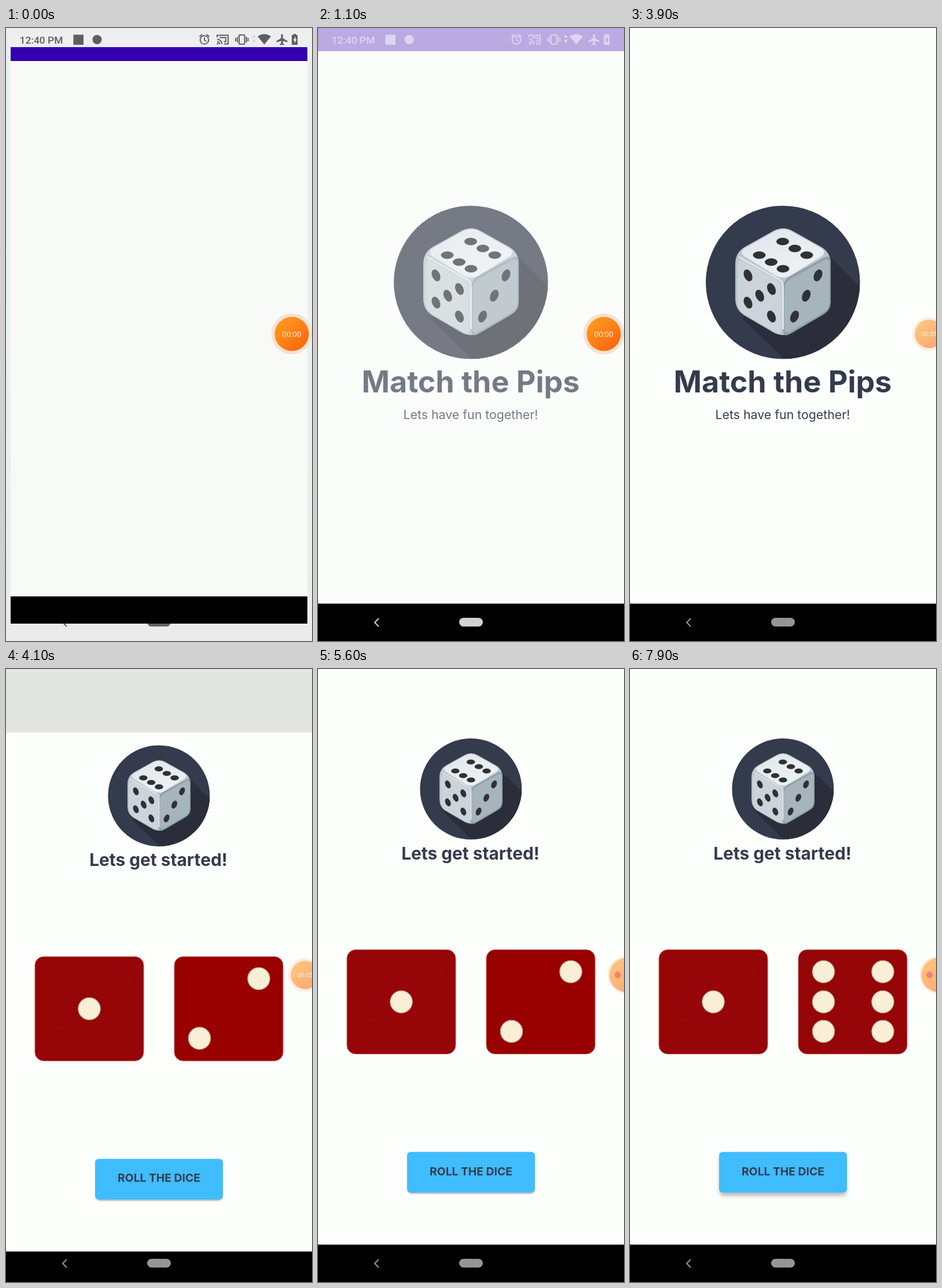
Write an HTML page that moves like this. It is 529x1058 px and loops after 8 s.

```html
<!DOCTYPE html>
<html lang="en">
<head>
<meta charset="utf-8">
<title>Dice game</title>
<style>
html, body { margin: 0; width: 100%; height: 100%; overflow: hidden; background: #fdfffc; }
svg { display: block; width: 100vw; height: 100vh; }
text { font-family: Inter, "Open Sans", sans-serif; fill: #343b4d; text-anchor: middle; }
.sys { font-family: Roboto, sans-serif; }
.bold { font-weight: 700; }
</style>
</head>
<body>
<svg viewBox="0 0 529 1058" xmlns="http://www.w3.org/2000/svg">
  <defs>
    <linearGradient id="wall" x2="0" y2="1">
      <stop offset="0" stop-color="#eceff0"/><stop offset=".5" stop-color="#edf0f0"/><stop offset="1" stop-color="#ebebeb"/>
    </linearGradient>
    <linearGradient id="orange" x1=".15" y1=".1" x2=".85" y2=".95">
      <stop offset="0" stop-color="#ff9a20"/><stop offset="1" stop-color="#ff650c"/>
    </linearGradient>
    <linearGradient id="top" x2="1" y2="1">
      <stop offset="0" stop-color="#dfe5e9"/><stop offset="1" stop-color="#f1f4f6"/>
    </linearGradient>
    <filter id="soft" x="-10%" y="-30%" width="120%" height="160%"><feGaussianBlur id="blur" stdDeviation="1.5"/></filter>
    <clipPath id="disc"><ellipse cx="264.3" cy="439" rx="133.3" ry="132.2"/></clipPath>
    <clipPath id="reveal"><rect id="revealBox" width="529" height="1058"/></clipPath>
    <g id="badge"></g>
  </defs>

  <g id="launch">
    <rect width="529" height="1058" fill="url(#wall)"/>
    <path d="M105 1019l-7 7 7 7" fill="none" stroke="#5f6368" stroke-width="2"/>
    <rect x="244" y="1018" width="41" height="15" rx="7.5" fill="#5f6368"/>
    <rect id="page" fill="#f8faf8"/>
    <rect id="bar" fill="#3500b0"/>
    <rect id="foot"/>
  </g>

  <g id="splash">
    <rect width="529" height="1058" fill="#fdfffc"/>
    <use href="#badge"/>
    <text class="bold" x="264" y="628.5" font-size="52">Match the Pips</text>
    <text x="264" y="674.5" font-size="21.3">Lets have fun together!</text>
    <rect y="993.5" width="529" height="65"/>
  </g>
  <rect id="dim" width="529" height="1058"/>

  <g id="game" clip-path="url(#reveal)">
    <g id="sheet">
      <rect width="529" height="1080" fill="#fdfffc"/>
      <use href="#badge" transform="translate(89.9 -82.7) scale(.66)"/>
      <text class="bold" x="263.5" y="328.5" font-size="29.8">Lets get started!</text>
      <g id="dieA" transform="translate(50 484.5)"></g>
      <g id="dieB" transform="translate(291 484.5)"></g>
      <rect id="shade" x="155" width="219" height="70" rx="6" filter="url(#soft)"/>
      <rect x="154" y="833.5" width="221" height="70" rx="6" fill="#3fbdff"/>
      <text class="bold" x="264.5" y="873.5" font-size="19.3">ROLL THE DICE</text>
      <rect y="993.5" width="529" height="87"/>
    </g>
  </g>

  <g id="nav">
    <path d="M105 1019l-7 7 7 7" fill="none" stroke="currentColor" stroke-width="2"/>
    <rect x="244" y="1018" width="41" height="15" rx="7.5" fill="currentColor"/>
  </g>

  <g id="status" fill="currentColor" stroke="none">
    <text class="sys" x="61" y="27" font-size="17.4" font-weight="500" style="fill:currentColor">12:40 PM</text>
    <rect x="116.500" y="11.500" width="17.500" height="17.500"/>
    <circle cx="157.500" cy="20" r="8"/>
    <g fill="none" stroke="currentColor" stroke-width="2">
      <circle cx="343" cy="20.500" r="7.300"/>
      <path d="M343 16v5l3.500 2M334.500 15l4.500-4M351.500 15l-4.500-4"/>
      <path d="M365 16v-3.500h19v15h-7M365 19.500a8.500 8.500 0 0 1 8.500 8.500M365 23.500a4.500 4.500 0 0 1 4.500 4.500"/>
      <path d="M369 16.500h11v7h-3.500"/>
      <rect x="403" y="12" width="9.500" height="16" rx="1"/>
      <path d="M400 15v10M397 17v6M415.500 15v10M418.500 17v6"/>
    </g>
    <circle cx="366" cy="27" r="1.500"/>
    <path id="arrows" d="M425 17l3.500-6 3.500 6zM425 20l3.500 6 3.500-6z"/>
    <path d="M435 14.500q11.500-8 23 0L446.500 28.500z"/>
    <path d="M475.500 12a1.600 1.600 0 0 1 3.200 0v5.500l8 5v2.200l-8-2.500v4.300l2.200 1.600v1.600l-3.800-1-3.800 1v-1.600l2.200-1.600v-4.300l-8 2.500v-2.200l8-5z"/>
    <path fill-rule="evenodd" d="M494 12h3v-2h4v2h3v17h-10zM500.500 14.500l-4 7h2.200v5l4-7h-2.200z"/>
  </g>

  <g id="bubble">
    <circle id="halo" cy="528" fill="#f5e2d5"/>
    <circle id="core" cy="528" fill="url(#orange)"/>
  </g>
  <text id="clock" class="sys" style="fill:#fff3e6"></text>
  <circle id="rec" cx="518" cy="528" r="5.500" fill="#f28075"/>
</svg>
<script>
const LOOP = 8000, STEP = 100;
const $ = id => document.getElementById(id);
const set = (id, attrs) => { for (const k in attrs) $(id).setAttribute(k, attrs[k]); };
const clamp = v => Math.max(0, Math.min(1, v));
const mix = (a, b, k) => a + (b - a) * k;
const ramp = (t, a, b) => clamp((t - a) / (b - a));
const easeOut = k => 1 - (1 - k) ** 3;
const grey = v => `rgb(${v},${v},${v})`;

// Polygon with rounded corners
function rounded(pts, r) {
  const toward = (a, b) => {
    const k = r / Math.hypot(b[0] - a[0], b[1] - a[1]);
    return [mix(a[0], b[0], k), mix(a[1], b[1], k)];
  };
  const n = pts.length;
  return pts.map((p, i) =>
    `${i ? 'L' : 'M'}${toward(p, pts[(i + n - 1) % n])}Q${p} ${toward(p, pts[(i + 1) % n])}`).join('') + 'Z';
}

function drawBadge() {
  const shape = (pts, r, fill) => `<path d="${rounded(pts, r)}" fill="${fill}"/>`;
  const pips = (pts, rx, ry, turn) => pts.map(([x, y]) =>
    `<ellipse rx="${rx}" ry="${ry}" transform="translate(${x} ${y}) rotate(${turn})" fill="#303135"/>`).join('');
  $('badge').innerHTML =
    '<g clip-path="url(#disc)"><rect x="130" y="305" width="270" height="268" fill="#343b4d"/>' +
    '<path d="M342 391L420 469V600H296L194 501Z" fill="#2b2e3a"/></g>' +
    shape([[264.5, 341], [347, 387], [347, 487], [264.5, 535], [182, 487], [182, 387]], 20, '#b9c5cc') +
    shape([[264.5, 435], [347, 390], [347, 487], [264.5, 535]], 14, '#8f9fa8') +
    shape([[264.5, 343], [343, 387], [264.5, 435], [186, 387]], 17, 'url(#top)') +
    shape([[186, 397], [262, 439], [262, 531], [186, 487]], 13, '#cbd4da') +
    shape([[267, 439], [345, 395], [345, 485], [267, 530]], 13, '#a6b4bc') +
    '<path d="M188 395L258 434Q264.500 438 264.500 447V520" fill="none" stroke="#e2e8eb" stroke-width="3"/>' +
    pips([[264, 368.5], [285, 380.5], [305.5, 392], [223.5, 392], [244, 404], [264.5, 415.5]], 11, 6.5, 0) +
    pips([[204, 427], [204, 474], [224.3, 462], [244.5, 450.5], [244.5, 498]], 6.8, 10.8, -24) +
    pips([[325, 427], [304.7, 462], [284.5, 498]], 6.8, 10.8, 24);
}

const L = 43.5, R = 146, T = 38, M = 90, B = 141;
const SPOTS = {
  1: [[94, M]],
  2: [[R, T], [L, B]],
  6: [[L, T], [R, T], [L, M], [R, M], [L, B], [R, B]]
};
function drawDie(id, value, fill) {
  const dots = (pts, look) => pts.map(([x, y]) => `<circle cx="${x}" cy="${y}" r="19.300" ${look}/>`).join('');
  $(id).innerHTML =
    `<rect width="188" height="180" rx="15" fill="${fill}" stroke="#c4605c"/>` +
    (value === 1 ? dots(SPOTS[2], 'fill="none" stroke="#a01012" stroke-opacity=".6"') : '') +
    dots(SPOTS[value], 'fill="#f9eed6" stroke="#b58a72" stroke-width="1.200"');
}

function drawLaunch(t) {
  const k = easeOut(ramp(t, 0, 400));
  const x = mix(8, 0, k), width = 529 - 2 * x;
  const y = mix(33, 0, k), end = mix(1028, 1058, k);
  const low = mix(57, 40, k), base = mix(981, 993.5, k);
  set('page', { x, y, width, height: end - y });
  set('bar', { x, y, width, height: low - y });
  set('foot', { x, y: base, width, height: end - base });
  $('status').style.color = grey(Math.round(mix(95, 255, ramp(t, 0, 400))));
  set('status', { opacity: 1 - ramp(t, 900, 1300) });
  set('arrows', { opacity: mix(.15, 1, ramp(t, 200, 600)) });
  set('nav', { opacity: ramp(t, 0, 500) });
  $('nav').style.color = grey(Math.round(mix(210, 149, ramp(t, 1200, 1800))));
  set('splash', { opacity: ramp(t, 900, 1200) });
}

function drawGame(t) {
  const on = t >= 4100;
  $('game').style.display = on ? '' : 'none';
  const open = t < 4500;
  const shift = open ? 1.8 * Math.exp((4200 - t) / 53) : 0;
  const cut = open ? 9 * Math.exp((4200 - t) / 40) : 0;
  set('sheet', { transform: `translate(0 ${shift})` });
  set('revealBox', { y: cut });
  set('dim', { opacity: on && open ? .1 : 0 });

  const rolled = t >= 6200;
  drawDie('dieA', 1, '#960507');
  drawDie('dieB', rolled ? 6 : 2, rolled ? '#960507' : '#990000');
  const lift = Math.max(ramp(t, 6000, 6100) * (1 - ramp(t, 6100, 6300)), ramp(t, 7700, 7900));
  set('shade', { y: mix(835.5, 839, lift), opacity: mix(.32, .28, lift) });
  set('blur', { stdDeviation: mix(1.5, 3.5, lift) });
}

function drawBubble(t) {
  const dock = easeOut(ramp(t, 1400, 1800)), hide = easeOut(ramp(t, 5300, 5600));
  const cx = mix(mix(494, 517, dock), 533, hide);
  const r = mix(mix(29.5, 24.5, dock), 29.5, hide);
  set('core', { cx, r });
  set('halo', { cx, r: r + mix(mix(6, 4.5, dock), 3, hide) });
  set('bubble', { opacity: mix(1, .57, dock) });
  const size = mix(13.2, 10.8, dock);
  set('clock', { x: cx, y: 528 + size * .36, 'font-size': size, opacity: t < 5400 ? 1 : 0 });
  const secs = [1500, 2700, 3300, 4900].filter(at => t >= at).length;
  $('clock').textContent = '00:0' + secs;
  set('rec', { opacity: t < 5400 ? 0 : 1 });
}

function render(ms) {
  const t = Math.floor(ms % LOOP / STEP) * STEP;
  drawLaunch(t);
  drawGame(t);
  drawBubble(t);
}

drawBadge();
const start = performance.now();
function tick() {
  render(performance.now() - start);
  requestAnimationFrame(tick);
}
tick();
</script>
</body>
</html>
```
